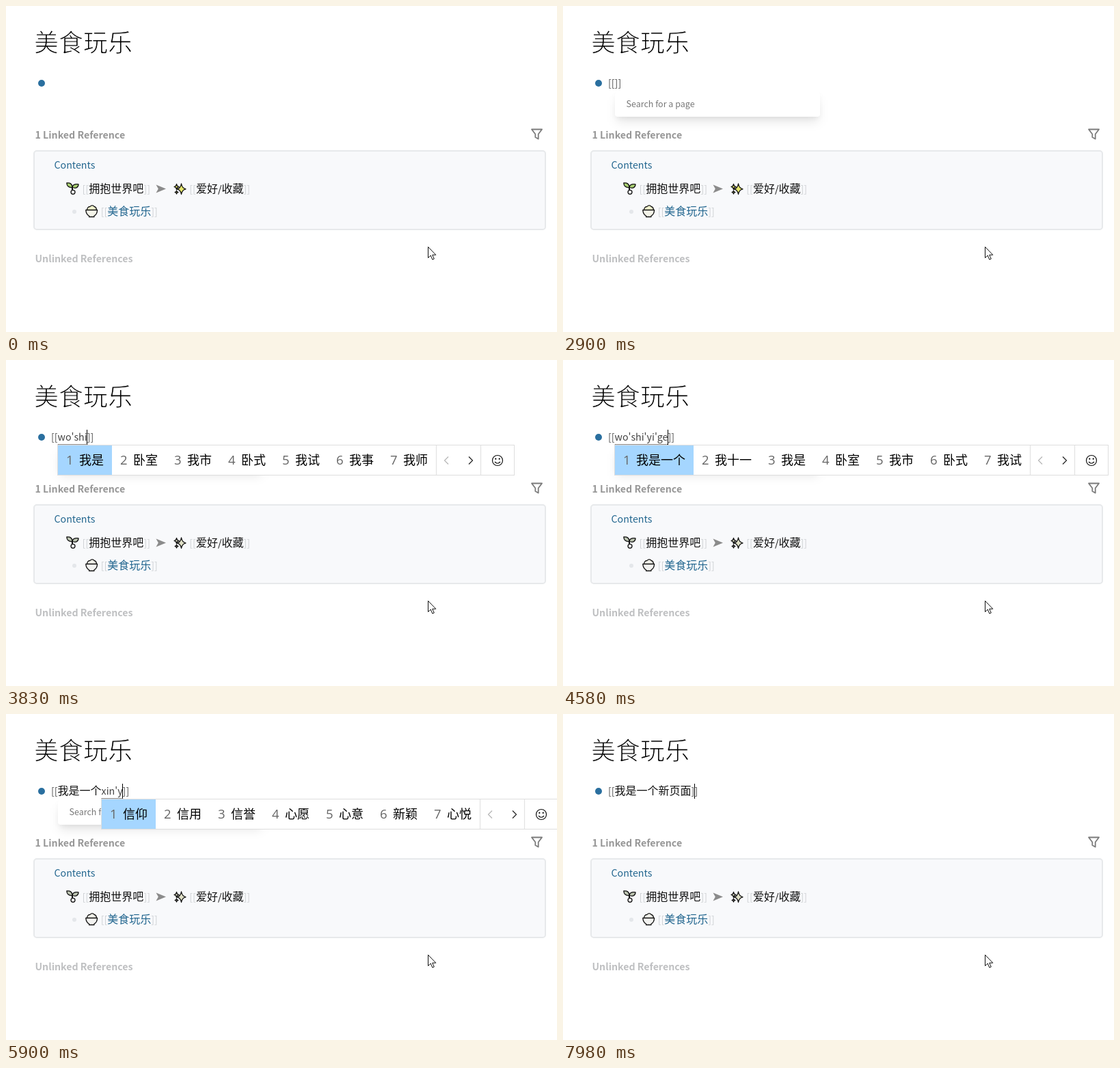
Animation of 806 by 477 pixels, one loop 8 s. Source, as an HTML page:

```html
<!DOCTYPE html>
<html lang="zh-CN">
<head>
<meta charset="utf-8">
<title>美食玩乐</title>
<style>
  html, body { margin: 0; width: 100%; height: 100%; overflow: hidden; background: #fff; }
  svg { display: block; }
  text { font: 16px "Noto Sans CJK SC", "Noto Sans CJK JP", "Noto Sans CJK", sans-serif; fill: #111; white-space: pre; }
  /* the Latin glyphs of this face run large beside its ideographs */
  text.latin, tspan.latin { font-size: 14.2px; }
  text.small { font-size: 12.5px; fill: #333; }
  /* a white outline thins the regular weight to a light one */
  text.title { font-size: 36px; font-weight: 300; fill: #000; stroke: #fff; stroke-width: 1.1; }
  text.head { font-weight: 700; fill: #979797; }
  text.pale { fill: #bfc0c2; }
  text.link { fill: #22668f; }
  text.bracket { fill: #cfd2d5; }
  text.typed { fill: #555; }
  text.cand { font-size: 18px; fill: #000; }
  text.digit { font: 18.5px "Open Sans", "Noto Sans", sans-serif; fill: #666; }
  .icon { stroke: #111; stroke-width: 1.3; stroke-linejoin: round; stroke-linecap: round; }
  .line { fill: none; stroke-width: 1.2; }
  .muted .icon { filter: saturate(.2); }
  #ghost { stroke: #fff; stroke-width: .7; filter: brightness(0) invert(1); }
  .far { fill: rgba(0, 0, 0, .1); filter: blur(7.5px); }
  .near { fill: rgba(0, 0, 0, .05); filter: blur(3px); }
</style>
</head>
<body>
<svg id="stage" width="806" height="477" viewBox="0 0 806 477">
  <defs><clipPath id="inCard"><rect x="76" y="213" width="294" height="113"/></clipPath></defs>

  <text class="title" x="41" y="66.5">美食玩乐</text>
  <circle cx="52" cy="113" r="5" fill="#2a6f9f"/>
  <text class="head latin" x="42.5" y="194">1 Linked Reference</text>
  <path d="M769 180.5H784L778.7 187.5V194.5L774.3 192V187.5Z" fill="none" stroke="#7b7b7b" stroke-width="1.8" stroke-linejoin="round"/>
  <text class="head pale latin" x="42.5" y="375">Unlinked References</text>

  <rect x="41" y="212" width="748" height="115" rx="4" fill="#f8f9fb" stroke="#e7e9eb" stroke-width="2"/>
  <g id="refs">
    <text class="link latin" x="70.5" y="238">Contents</text>
    <g class="icon" fill="#a9d072">
      <path d="M97 265.5C91.5 266 89 263 88.8 259C94 258.3 97 260.5 97 265.5Z"/>
      <path d="M97 265.5C97.5 261.5 100.5 260.2 106 260.8C106 265.5 102.5 267.5 97 265.5Z"/>
      <path d="M97 265.5V272" fill="none" stroke-width="2"/>
      <circle cx="98" cy="272.3" r="3" fill="#eee"/>
    </g>
    <text class="bracket latin" x="111.5" y="273">[[</text>
    <text x="121.2" y="273">拥抱世界吧</text>
    <text class="bracket latin" x="201.5" y="273">]]</text>
    <path d="M219.5 261.5L234 267.5L219.5 273.5L222.8 267.5Z" fill="#8b8b8b"/>
    <g class="icon" fill="#e6e76c">
      <path d="M256.5 260Q257.5 266.5 263 267.8Q257.5 269 256.5 275.5Q255.5 269 250 267.8Q255.5 266.5 256.5 260Z"/>
      <path d="M249.5 260.5L250.6 263.4L253 264.5L250.6 265.6L249.5 268.5L248.4 265.6L246 264.5L248.4 263.4Z"/>
      <path d="M249.5 270L250.2 271.8L252 272.5L250.2 273.2L249.5 275L248.8 273.2L247 272.5L248.8 271.8Z"/>
    </g>
    <text class="bracket latin" x="268.3" y="273">[[</text>
    <text x="278" y="273">爱好<tspan class="latin">/</tspan>收藏</text>
    <text class="bracket latin" x="347.5" y="273">]]</text>
    <circle cx="100" cy="301" r="3" fill="#e4e7ea"/>
    <g class="icon" fill="#f3f3e8">
      <path d="M118.5 299C118.5 295 121 293.5 123 293.5C124.5 291.3 128 291.5 129 293.5C131 294 132.5 296 132.3 299Z" fill="#f0f2cc"/>
      <path d="M116.8 298.5H133.6C133.4 303 131.5 305.8 129 307V308.5H121.5V307C119 305.8 117 303 116.8 298.5Z"/>
    </g>
    <text class="bracket latin" x="138.7" y="306">[[</text>
    <text class="link" x="148.3" y="306">美食玩乐</text>
    <text class="bracket latin" x="212.2" y="306">]]</text>
  </g>

  <g id="popup">
    <rect class="far" x="79" y="138" width="294"/>
    <rect class="near" x="78" y="131" width="296"/>
    <rect class="sheet" x="76" y="125" width="300" rx="4" fill="#fff"/>
    <text class="small" id="hint" x="92.5" y="148" style="fill:#777">Search for a page</text>
    <g id="list">
      <g clip-path="url(#inCard)">
        <rect x="76" y="213" width="294" height="113" fill="#f8f9fb"/>
        <use id="ghost" href="#refs"/>
      </g>
      <rect x="370" y="168" width="6" height="309" fill="#f1f1f1"/>
      <rect x="370" y="168" width="6" height="304" fill="#d9d9d9"/>
    </g>
  </g>

  <text class="typed latin" id="open" x="66" y="118"></text>
  <text id="done" y="118"></text>
  <text class="typed latin" id="comp" y="118" style="fill:#444"></text>
  <text class="typed latin" id="close" y="118"></text>
  <line id="dots" y1="123.5" y2="123.5" stroke="#222" stroke-dasharray="1 1"/>
  <rect id="caret" width="1" height="22"/>
  <g id="ime"></g>

  <path d="M617.5 352.5V368.5L621.2 365L623.8 371L626.3 370L623.7 364.2H628.8Z" fill="#fff" stroke="#111"/>
</svg>

<script>
const LOOP = 8000;
const $ = id => document.getElementById(id);
const stage = $('stage');

function add(parent, tag, attrs, label = '') {
  const el = document.createElementNS('http://www.w3.org/2000/svg', tag);
  for (const key in attrs) el.setAttribute(key, attrs[key]);
  el.textContent = label;
  return parent.appendChild(el);
}

// Each step changes only the listed parts of the state.
const blank = { open: '', done: '', comp: '', close: '', caret: false, skip: 0, words: '', popup: 0, list: false, muted: false };
const steps = [
  [0, {}],
  [160, { caret: true }],
  [690, { caret: false }],
  [1220, { caret: true }],
  [1770, { caret: false }],
  [1970, { open: '[', close: ']', caret: true }],
  [2370, { open: '[[', close: ']]', popup: .2 }],
  [2500, { popup: .6 }],
  [2570, { popup: 1 }],
  [2900, { caret: false }],
  [3230, { comp: 'w', caret: true, words: '我 为 五 玩 哇 王 问' }],
  [3290, { list: true, muted: true }],
  [3430, { comp: 'wo', list: false }],
  [3560, { words: '我 窝 握 卧 沃 涡 喔' }],
  [3630, { comp: "wo's", words: '我是 我说 我上 卧室 我市 我试 我事' }],
  [3760, { comp: "wo'sh" }],
  [3830, { comp: "wo'shi", words: '我是 卧室 我市 卧式 我试 我事 我师' }],
  [4160, { comp: "wo'shi'y", words: '我是有 我是要 我是一 我是因 我是 卧室 我市' }],
  [4230, { comp: "wo'shi'yi", words: '我是一 我十一 我是 卧室 我市 卧式 我试' }],
  [4430, { comp: "wo'shi'yi'g", words: '我是一个 我十一 我是 卧室 我市 卧式 我试' }],
  [4580, { comp: "wo'shi'yi'ge" }],
  [4840, { done: '我是一个', comp: '', words: '' }],
  [5170, { comp: 'x', words: '下 想 小 向 新 笑 学' }],
  [5230, { comp: 'xi', words: '西 系 洗 戏 喜 细 吸' }],
  [5430, { comp: 'xin' }],
  [5500, { words: '新 心 信 欣 辛 心里 信息' }],
  [5900, { comp: "xin'y", words: '信仰 信用 信誉 心愿 心意 新颖 心悦' }],
  [6030, { comp: "xin'ye" }],
  [6100, { words: '心业 新业 新叶 新页 信业 心叶 新野' }],
  [6300, { comp: "xin'ye'm", words: '新页面 新野门 新业 新叶 新页 心业 信业' }],
  [6830, { done: '我是一个新页面', comp: '', words: '' }],
  [7380, { caret: false }],
  [7780, { caret: true, skip: 1 }],
  [7980, { popup: 0 }],
];
let state = blank;
const states = steps.map(([at, change]) => ({ at, ...(state = { ...state, ...change }) }));

function buildList() {
  const pages = ['New page: w', 'WAIT', 'watermelon', 'NOW', 'kiwiFruit',
    'draws/2021-11-28-10-40-16.excalidraw', 'shower', 'draws', 'strawberry'];
  pages.forEach((page, i) => {
    const y = 184 + 36 * i;
    const bar = add($('list'), 'rect', { y: y + 1, height: 4, fill: '#fbc02d' });
    const label = add($('list'), 'text', { class: 'small', x: 92.5, y }, page);
    const hit = page.toLowerCase().indexOf('w');
    bar.setAttribute('x', label.getStartPositionOfChar(hit).x);
    bar.setAttribute('width', label.getSubStringLength(hit, 1));
  });
}

function drawIme(left, words) {
  const ime = $('ime');
  ime.textContent = '';
  if (!words) return;
  const cells = words.split(' ');
  const cellWidth = word => 43 + 18 * word.length;
  const nav = left + 1 + cells.reduce((sum, word) => sum + cellWidth(word), 0);
  const stroke = (d, color) => add(ime, 'path', { class: 'line', d, stroke: color });

  add(ime, 'rect', { x: left + .5, y: 124.5, width: nav + 114 - left, height: 44, fill: '#fff', stroke: '#dedede' });
  let x = left + 1;
  cells.forEach((word, i) => {
    if (!i) add(ime, 'rect', { x, y: 125, width: cellWidth(word), height: 43, fill: '#a5d6ff' });
    add(ime, 'text', { class: 'digit', x: x + 12, y: 153 }, i + 1);
    add(ime, 'text', { class: 'cand', x: x + 31, y: 153 }, word);
    x += cellWidth(word);
  });
  stroke(`M${nav + .5} 125V168M${nav + 65.5} 125V168`, '#e2e2e2');
  stroke(`M${nav + 18} 141.5l-5.5 5.5l5.5 5.5`, '#b5b5b5');
  stroke(`M${nav + 48} 141.5l5.5 5.5l-5.5 5.5`, '#222');
  const face = nav + 90;
  add(ime, 'circle', { class: 'line', cx: face, cy: 147, r: 7.5, stroke: '#111' });
  stroke(`M${face - 4} 149q4 4.5 8 0`, '#111');
  for (const dx of [-2.7, 2.7]) add(ime, 'circle', { cx: face + dx, cy: 144.7, r: 1.1 });
}

function render(s) {
  for (const id of ['open', 'done', 'comp', 'close']) $(id).textContent = s[id];
  let x = 66 + $('open').getComputedTextLength();
  $('done').setAttribute('x', x);
  x += $('done').getComputedTextLength();
  $('comp').setAttribute('x', x);
  $('dots').setAttribute('x1', Math.floor(x) + 1);
  drawIme(Math.floor(x), s.words);
  x += $('comp').getComputedTextLength();
  $('dots').setAttribute('x2', x);
  $('dots').style.visibility = s.comp ? '' : 'hidden';
  $('close').setAttribute('x', x);

  if (s.skip) x += $('close').getSubStringLength(0, s.skip);
  $('caret').setAttribute('x', Math.floor(x));
  $('caret').setAttribute('y', s.open ? 102 : 103);
  $('caret').style.visibility = s.caret ? '' : 'hidden';

  $('popup').style.opacity = s.popup;
  $('list').style.visibility = s.list ? '' : 'hidden';
  $('hint').style.visibility = s.list ? 'hidden' : '';
  const height = s.list ? 360 : 37;
  $('popup').querySelector('.sheet').setAttribute('height', height);
  $('popup').querySelector('.far').setAttribute('height', height - 6);
  $('popup').querySelector('.near').setAttribute('height', height - 4);
  stage.classList.toggle('muted', s.muted);
}

buildList();
const start = performance.now();
let shown;
function tick() {
  const t = (performance.now() - start) % LOOP;
  const now = states.filter(s => s.at <= t).pop();
  if (now !== shown) render(shown = now);
  requestAnimationFrame(tick);
}
tick();
</script>
</body>
</html>
```
